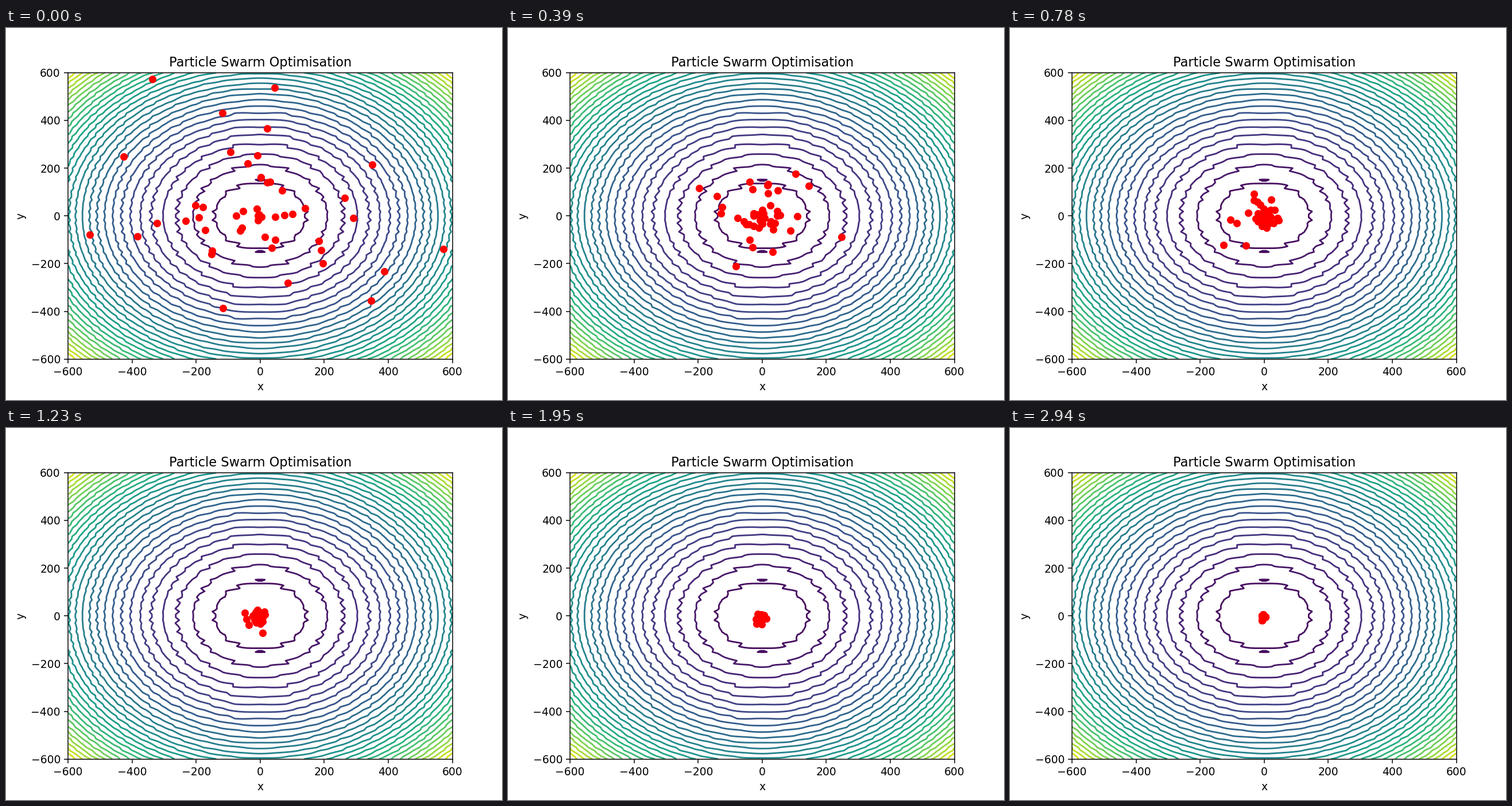
These frames come from a looping animation (864 by 648 pixels, 2970 ms). A matplotlib script:

```python
import numpy as np
import matplotlib.pyplot as plt
from matplotlib.animation import FuncAnimation

FRAMES, INTERVAL = 99, 30
COUNT = 45
rng = np.random.default_rng(7)


def griewank(x, y):
    return 1 + (x**2 + y**2) / 4000 - np.cos(x) * np.cos(y / np.sqrt(2))


# Local minima near the origin, where particles come to rest
minima = np.array([(-2, -4), (1, -1), (-1, 1), (-2, 0)]) * np.pi * [1, np.sqrt(2)]

# A few far particles, the rest in a ring of random directions
far = np.array([(-337, 572), (45, 536), (-118, 431), (22, 366), (-426, 249),
                (349, 215), (-532, -79), (-384, -85), (-117, -386),
                (346, -355), (387, -233), (572, -140)])
near = COUNT - len(far)
theta = rng.uniform(0, 2 * np.pi, near)
radius = rng.uniform(30, 330, near)
ring = np.column_stack([radius * np.cos(theta), radius * np.sin(theta)])
start = np.vstack([far, ring])

# Each particle swings around its own minimum and closes in at its own rate
home = minima[rng.integers(0, len(minima), COUNT)]
reach = start - home
swing = rng.normal(0, 0.7, (COUNT, 2)) * np.hypot(*reach.T)[:, None]
speed = rng.uniform(0.3, 1.1, (COUNT, 1)) * rng.choice([-1, 1], (COUNT, 1))
rate = rng.uniform(0.6, 1.5, (COUNT, 1))

TIMES = [0, 8, 19, 26, 41, 65, 98]
SHRINK = np.log([1, 0.42, 0.28, 0.14, 0.05, 0.01, 0.0003])


def swarm_at(frame):
    scale = np.exp(rate * np.interp(frame, TIMES, SHRINK))
    phase = speed * frame
    return home + scale * (reach * np.cos(phase) + swing * np.sin(phase))


fig, ax = plt.subplots(figsize=(6.4, 4.8), dpi=135)
axis = np.linspace(-600, 600, 100)
X, Y = np.meshgrid(axis, axis)
ax.contour(X, Y, griewank(X, Y), 30, cmap="viridis")
ax.set(xlim=(-600, 600), ylim=(-600, 600), xlabel="x", ylabel="y",
       title="Particle Swarm Optimisation")
dots, = ax.plot([], [], "ro")


def update(frame):
    dots.set_data(*np.vstack([swarm_at(frame), minima]).T)
    return dots,


anim = FuncAnimation(fig, update, frames=FRAMES, interval=INTERVAL,
                     repeat=True, repeat_delay=0)
plt.show()
```
